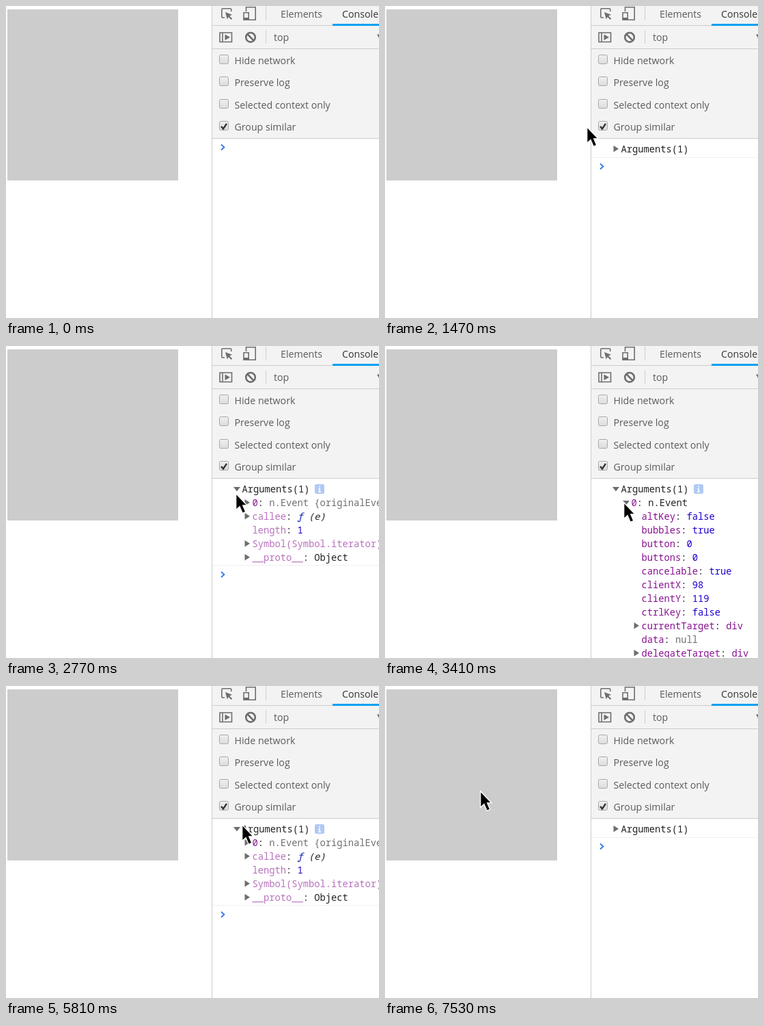
Animation of 546 by 456 pixels, one loop 7.99 s. Source, as an HTML page:

```html
<!DOCTYPE html>
<html lang="en">
<head>
<meta charset="utf-8">
<title>Event arguments in the console</title>
<style>
  html, body { margin: 0; width: 100%; height: 100%; overflow: hidden; background: #fff; }
  svg { display: block; }
  text { white-space: pre; }
  .ui { font: 14.2px "Open Sans", "Noto Sans", sans-serif; fill: #5a5a5a; }
  .log { font: 13.75px "Noto Sans Mono", "DejaVu Sans Mono", monospace; fill: #222; }
  .key { fill: #881391; }
  .dim { fill: #b871bd; }
  .num { fill: #1c00cf; }
  .grey { fill: #707070; }
  .fn { fill: #0d22aa; font-style: italic; }
  .it { font-style: italic; }
  .icon { fill: none; stroke: #6e6e6e; stroke-width: 1.6; }
  .solid { fill: #6e6e6e; }
</style>
</head>
<body>
<svg width="546" height="456" viewBox="0 0 546 456">
  <defs>
    <linearGradient id="box" x2="0" y2="1">
      <stop stop-color="#f0f0f0"/><stop offset="1" stop-color="#dcdcdc"/>
    </linearGradient>
  </defs>
  <rect x="2" y="5" width="250" height="250" fill="#ccc"/>

  <path d="M302 0H546V193H302z" fill="#f3f3f3"/>
  <path d="M301.5 0V456M302 28.5H546M302 62.5H546M302 193.5H546M380.5 1V21M380.5 36V55" stroke="#ccc"/>
  <path d="M478 26H546V29H478z" fill="#03a0f0"/>
  <g class="icon">
    <path d="M320 17H317Q315.800 17 315.800 15.800V5Q315.800 3.800 317 3.800H328.500Q329.700 3.800 329.700 5V8"/>
    <path d="M351.500 8V1.800H365.200V20.200H356"/>
    <path d="M348 9.800H355.200V20.200H348z"/>
    <path d="M313 39H330.500V52.500H313zM317 39V52"/>
    <circle cx="358" cy="45.800" r="6.800" stroke-width="2.600"/>
    <path d="M353.300 41L362.700 50.600" stroke-width="2.600"/>
  </g>
  <path class="solid" d="M321 9L331 12.700 327.200 14.500 331.200 18.500 329.700 20 325.700 16 323.800 19.500zM348 17H355V20H348zM320.500 41.500L328 45.800 320.500 50zM543 41.500H549L546 47z"/>
  <g class="ui">
    <text x="402" y="17">Elements</text>
    <text x="492" y="17" fill="#333">Console</text>
    <text x="392" y="51">top</text>
    <g id="options"></g>
  </g>

  <g id="logs" class="log"></g>
  <path id="prompt" d="M315 202.500L319.300 206.500 315 210.500" fill="none" stroke="#3b7cea" stroke-width="2"/>

  <g id="pointer">
    <circle id="click" r="15" fill="#ff0" opacity=".6"/>
    <path d="M.7 .7V24.500L6 19.600 10.200 29.300 14.800 27.400 10.700 17.900H16.800z" stroke="#fff" stroke-width="1.300"/>
  </g>
</svg>
<script>
const LOOP = 7990;
const $ = id => document.getElementById(id);

$('options').innerHTML = ['Hide network', 'Preserve log', 'Selected context only', 'Group similar']
  .map((label, i) => {
    const y = Math.round(71.5 + i * 32.5) + .5;
    return `<rect x="312.500" y="${y - 1}" width="13" height="13" rx="2" fill="url(#box)" stroke="#a8a8a8"/>
      <text x="334.500" y="${y + 12.5}">${label}</text>`;
  }).join('') + '<path d="M315 176L318 179.500 323 172" fill="none" stroke="#333" stroke-width="2.400"/>';

const span = (cls, s) => `<tspan class="${cls}">${s}</tspan>`;
const prop = (key, value, cls = '', keyCls = 'key') => span(keyCls, key) + ': ' + span(cls, value);

// One console line; arrow is 'open', 'shut' or empty.
function row(line, level, arrow, html) {
  const x = 346 + level * 15, y = 209 + line * 20;
  const shape = { open: 'm-13 -3h10l-5 6.500z', shut: 'm-11.500 -5v9.500l7.500 -4.750z' }[arrow];
  return (shape ? `<path d="M${x} ${y}${shape}" fill="#6e6e6e"/>` : '') +
    `<text x="${x - .5}" y="${y + 5}">${html}</text>`;
}
const rule = y => `<path d="M302 ${y}.5H546" stroke="#f0f0f0"/>`;

const head = row(0, 0, 'open', 'Arguments(1)') +
  `<rect x="452" y="202" width="14" height="14" rx="2.500" fill="#b0c9f5"/>
   <path d="M459 204.500v2M457.500 208.500h1.500v5M457 213.200h4" fill="none" stroke="#fff" stroke-width="1.500"/>`;

const fields = [
  ['altKey', 'false'], ['bubbles', 'true'], ['button', 0], ['buttons', 0], ['cancelable', 'true'],
  ['clientX', 98], ['clientY', 119], ['ctrlKey', 'false'],
  ['currentTarget', 'div', 'key', 'shut'], ['data', 'null', 'grey'], ['delegateTarget', 'div', 'key', 'shut']
];

const views = {
  empty: { prompt: 0, html: '' },
  folded: { prompt: 28, html: row(0, 0, 'shut', 'Arguments(1)') + rule(221) },
  args: {
    prompt: 127.5,
    html: head +
      row(1, 1, 'shut', span('key', '0') + ': ' + span('grey', 'n.Event {originalEvent: MouseEvent')) +
      row(2, 1, 'shut', prop('callee', 'ƒ ', 'fn', 'dim') + span('it', '(e)')) +
      row(3, 1, '', prop('length', 1, 'num', 'dim')) +
      row(4, 1, 'shut', prop('Symbol(Symbol.iterator)', 'ƒ', 'fn', 'dim')) +
      row(5, 1, 'shut', prop('__proto__', 'Object', '', 'dim')) + rule(320)
  },
  event: {
    prompt: 300,
    html: head + row(1, 1, 'open', prop('0', 'n.Event')) +
      fields.map(([key, value, cls = 'num', arrow], i) => row(i + 2, 2, arrow, prop(key, value, cls))).join('')
  }
};
const scenes = [[0, 'empty'], [850, 'folded'], [2310, 'args'], [3410, 'event'], [4950, 'args'], [6600, 'folded']];
const clicks = [[760, 850], [2160, 2310], [3170, 3240], [4800, 4950], [6450, 6600]];

// Pointer moves: first step, last step, step count, end point, optional two curve handles.
const entry = [355, 262];
const moves = [
  [240, 610, 6, [115, 144], [240, 170], [150, 125]],
  [1160, 1930, 11, [338, 210], [120, 150], [578, 212]],
  [2000, 2080, 2, [337, 211]],
  [2230, 2310, 2, [336, 212]],
  [2620, 2620, 1, [334, 213]],
  [2770, 3000, 4, [347, 228]],
  [3170, 3170, 1, [349, 228]],
  [5350, 5580, 4, [346, 201], [365, 226], [385, 208]],
  [5810, 6360, 8, [336, 199], [342, 203], [352, 223]],
  [6750, 6750, 1, [336, 204]],
  [6920, 6920, 1, [337, 206]],
  [7380, 7530, 3, [139, 153]]
];

function pointerAt(t) {
  let pos = entry;
  for (const [first, last, steps, end, h1 = pos, h2 = end] of moves) {
    if (t < first) break;
    const gap = (last - first) / (steps - 1 || 1) || 1;
    const k = Math.min(steps - 1, Math.floor((t - first + 5) / gap));
    const u = pos === entry ? k / (steps - 1) : (k + 1) / steps, v = 1 - u;
    const from = pos;
    pos = end.map((e, i) => Math.round(
      v * v * v * from[i] + 3 * v * v * u * h1[i] + 3 * v * u * u * h2[i] + u * u * u * e));
  }
  return pos;
}

let shown;
function draw(now) {
  const t = now % LOOP;
  const name = scenes.filter(([start]) => t >= start).pop()[1];
  if (name !== shown) {
    shown = name;
    $('logs').innerHTML = views[name].html;
    $('prompt').setAttribute('transform', `translate(0 ${views[name].prompt})`);
  }
  $('pointer').setAttribute('transform', `translate(${pointerAt(t)})`);
  $('pointer').style.display = t < moves[0][0] ? 'none' : '';
  $('click').style.display = clicks.some(([on, off]) => t >= on && t < off) ? '' : 'none';
  requestAnimationFrame(() => draw(performance.now()));
}
draw(performance.now());
</script>
</body>
</html>
```
